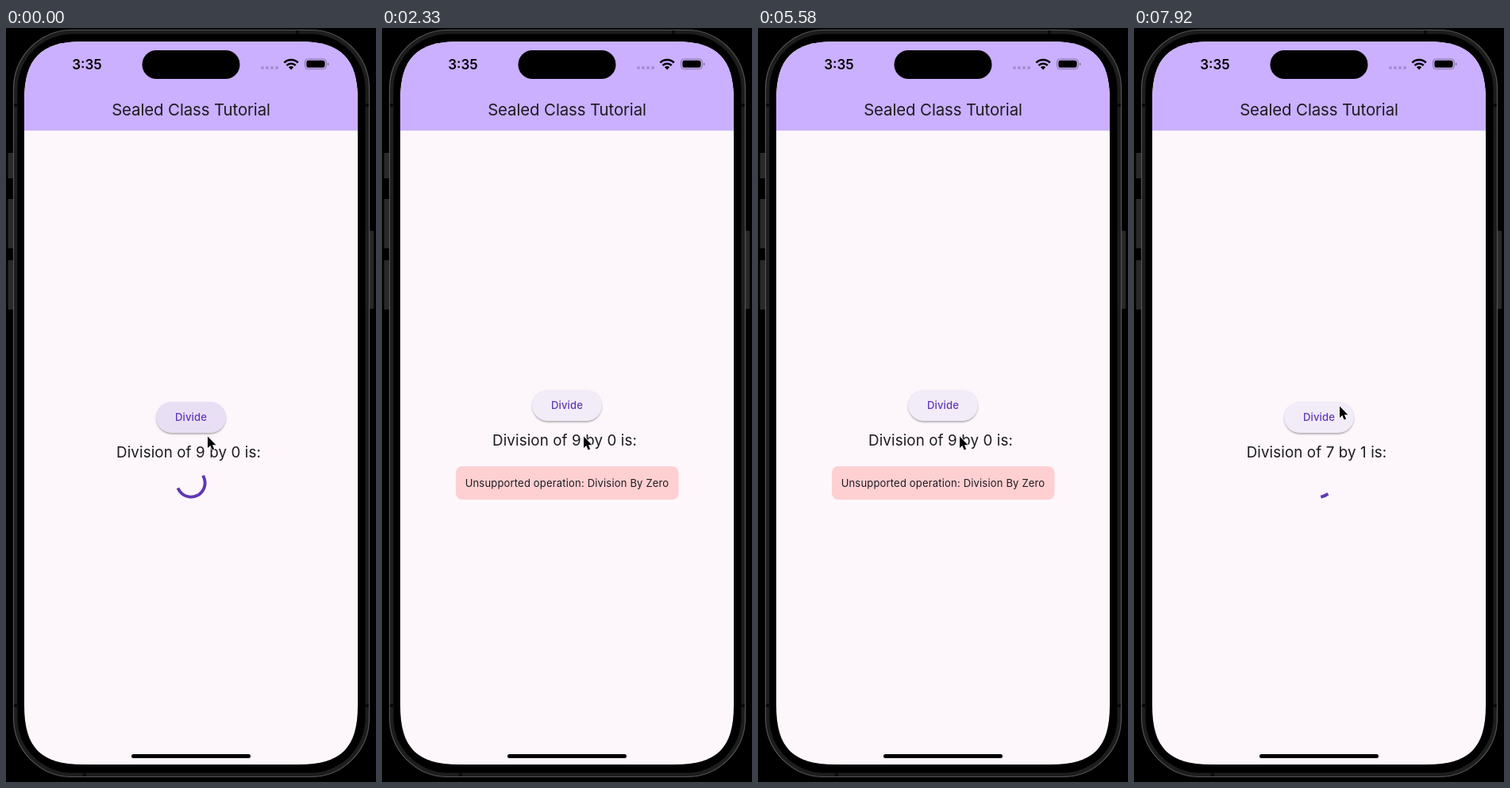
An HTML page for the animation above (8000 ms loop, 466 by 948 pixels).

```html
<!DOCTYPE html>
<html lang="en">
<head>
<meta charset="utf-8">
<title>Sealed Class Tutorial</title>
<style>
  html, body { margin: 0; width: 100%; height: 100%; overflow: hidden; background: #000; }
  svg { display: block; width: 100vw; height: 100vh; }
  text { font-family: Inter, Roboto, sans-serif; fill: #1d1b20; text-anchor: middle; }
  .title { font-size: 20.4px; letter-spacing: -.1px; }
  .clock { font-size: 17px; font-weight: 600; fill: #000; }
  .label { font-size: 13.1px; font-weight: 500; letter-spacing: .1px; fill: #6038b6; }
  .question { font-size: 18.8px; letter-spacing: .1px; }
  .message { font-size: 13px; letter-spacing: .18px; }
</style>
</head>
<body>
<svg viewBox="0 0 466 948">
  <defs>
    <clipPath id="screen"><path id="outline" d="M23 91C23 38 44 17 97 17H369C422 17 443 38 443 91V852C443 905 422 926 369 926H97C44 926 23 905 23 852Z"/></clipPath>
    <clipPath id="pill"><rect x="189" y="470" width="88" height="39" rx="19.5"/></clipPath>
    <filter id="blur" x="-20%" y="-20%" width="140%" height="150%"><feGaussianBlur stdDeviation="1.1"/></filter>
  </defs>

  <rect width="466" height="948"/>
  <g fill="#292929">
    <rect x="2.5" y="157" width="7" height="32" rx="1"/>
    <rect x="2.5" y="215" width="7" height="62" rx="1"/>
    <rect x="2.5" y="292" width="7" height="62" rx="1"/>
    <rect x="457" y="255" width="6" height="98" rx="1"/>
  </g>
  <rect x="9.5" y="2.5" width="448" height="939" rx="74" fill="#1d1d1d" stroke="#555" stroke-width="1.2"/>
  <rect x="14.5" y="7.5" width="438" height="929" rx="69"/>
  <path d="M367 3v5M99 936v5M10 97h5M452 97h5M10 852h5M452 852h5" stroke="#0b0b0b" stroke-width="4"/>

  <g clip-path="url(#screen)">
    <rect x="23" y="17" width="420" height="909" fill="#fdf7fc"/>
    <rect x="23" y="17" width="420" height="112" fill="#cab0fe"/>
  </g>
  <rect x="171.5" y="28" width="123" height="36" rx="18"/>
  <text class="clock" x="102" y="52">3:35</text>
  <g fill="#a78dd6">
    <circle cx="323" cy="50" r="2.1"/><circle cx="329" cy="50" r="2.1"/>
    <circle cx="335" cy="50" r="2.1"/><circle cx="341" cy="50" r="2.1"/>
  </g>
  <g fill="none" stroke="#000" stroke-width="2.5">
    <path d="M350.4 43.6a12.3 12.3 0 0 1 17.4 0M353.5 47a8 8 0 0 1 11.2 0"/>
  </g>
  <path d="M355.9 49.2a4.6 4.6 0 0 1 6.4 0L359.1 52.4Z"/>
  <rect x="376.5" y="39" width="27" height="12.6" rx="4" fill="none" stroke="#85719f"/>
  <rect x="378.4" y="40.8" width="23.2" height="9" rx="2.4"/>
  <path d="M405 43.2q1.6.6 1.6 2.1t-1.6 2.1z" fill="#85719f"/>
  <text class="title" x="233" y="110">Sealed Class Tutorial</text>
  <rect x="158" y="913" width="150" height="5" rx="2.5"/>

  <g id="content">
    <rect x="189.3" y="471.4" width="87.4" height="39" rx="19.5" fill="#000" opacity=".34" filter="url(#blur)"/>
    <rect x="189" y="470" width="88" height="39" rx="19.5" fill="#f2ebf8"/>
    <circle id="splash" cx="259" cy="489" fill="#673ab7" clip-path="url(#pill)"/>
    <text class="label" x="233" y="493.8">Divide</text>
    <text class="question" id="question" x="230" y="540"></text>
  </g>

  <path id="spinner" fill="none" stroke="#5f37b5" stroke-width="3.9" stroke-linecap="square"/>
  <g id="error">
    <rect x="93" y="551" width="280.5" height="42" rx="8" fill="#fed0d2"/>
    <text class="message" x="233" y="577">Unsupported operation: Division By Zero</text>
  </g>

  <g id="ring" fill="none">
    <circle cx="259" cy="476" r="20" stroke="#fff" stroke-width="4.6" opacity=".7"/>
    <circle cx="259" cy="476" r="20" stroke="#000" stroke-width="3"/>
  </g>
  <path id="cursor" d="M0 0V14.6L3.3 11.6L5.6 17L8.2 15.9L5.9 10.7H10.4Z" stroke="#fff" stroke-width="1.6" stroke-linejoin="round" paint-order="stroke"/>
</svg>

<script>
const LOOP = 8000, STEP = 1000 / 12;
const RESULT_AT = 1720, PRESS_AT = 6640, RELEASE_AT = 6790, RELOAD_AT = 6800;
const FIRST_LOAD = -282;

const el = id => document.getElementById(id);
const show = (id, on) => el(id).setAttribute('visibility', on ? 'visible' : 'hidden');
const set = (id, attrs) => { for (const k in attrs) el(id).setAttribute(k, attrs[k]); };
const clamp = x => Math.min(1, Math.max(0, x));
const smooth = x => x * x * (3 - 2 * x);

// cubic-bezier(.4, 0, .2, 1), solved by bisection
function fastOutSlowIn(x) {
  if (x <= 0 || x >= 1) return clamp(x);
  let lo = 0, hi = 1, s;
  for (let i = 0; i < 24; i++) {
    s = (lo + hi) / 2;
    const r = 1 - s;
    if (1.2 * r * r * s + .6 * r * s * s + s ** 3 < x) lo = s; else hi = s;
  }
  return 3 * (1 - s) * s * s + s ** 3;
}

// Material indeterminate arc: 1333 ms stroke cycle over a 2222 ms rotation
function arcPath(elapsed) {
  const cycle = elapsed / 1333 % 1, turn = elapsed / 2222;
  const head = fastOutSlowIn(cycle * 2), tail = fastOutSlowIn(cycle * 2 - 1);
  const start = Math.PI * (-.5 + 1.5 * tail + 2 * turn + .5 * cycle);
  const sweep = Math.max(1.5 * Math.PI * (head - tail), .001);
  const point = a => `${233 + 17.6 * Math.cos(a)} ${572 + 17.6 * Math.sin(a)}`;
  return `M${point(start)}A17.6 17.6 0 ${sweep > Math.PI ? 1 : 0} 1 ${point(start + sweep)}`;
}

function drawSplash(t) {
  const second = t >= PRESS_AT;
  const released = t - (second ? RELEASE_AT : FIRST_LOAD - 10);
  const fadeIn = second ? clamp((t - PRESS_AT) / 75) : 1;
  const fadeOut = 1 - clamp((released - 225) / 150);
  set('splash', {
    r: 20 + 70 * fastOutSlowIn(clamp(released / 200)),
    opacity: .11 * fadeIn * fadeOut
  });
}

function render(t) {
  const failed = t >= RESULT_AT && t < RELOAD_AT;
  const reloaded = t >= RELOAD_AT;
  const move = smooth(clamp((t - 5900) / 500));

  set('content', { transform: `translate(0 ${failed ? -15 : 0})` });
  el('question').textContent = `Division of ${reloaded ? '7 by 1' : '9 by 0'} is:`;
  show('error', failed);
  show('spinner', !failed);
  if (!failed) set('spinner', { d: arcPath(t - (reloaded ? RELOAD_AT : FIRST_LOAD)) });
  drawSplash(t);
  show('ring', t >= PRESS_AT && t < RELEASE_AT);
  set('cursor', { transform: `translate(${254 + 5 * move} ${513.5 - 38 * move})` });
}

const origin = performance.now();
function tick() {
  const t = (performance.now() - origin) % LOOP;
  render(Math.floor((t + 4) / STEP) * STEP % LOOP);
  requestAnimationFrame(tick);
}
render(0);
requestAnimationFrame(tick);
</script>
</body>
</html>
```
